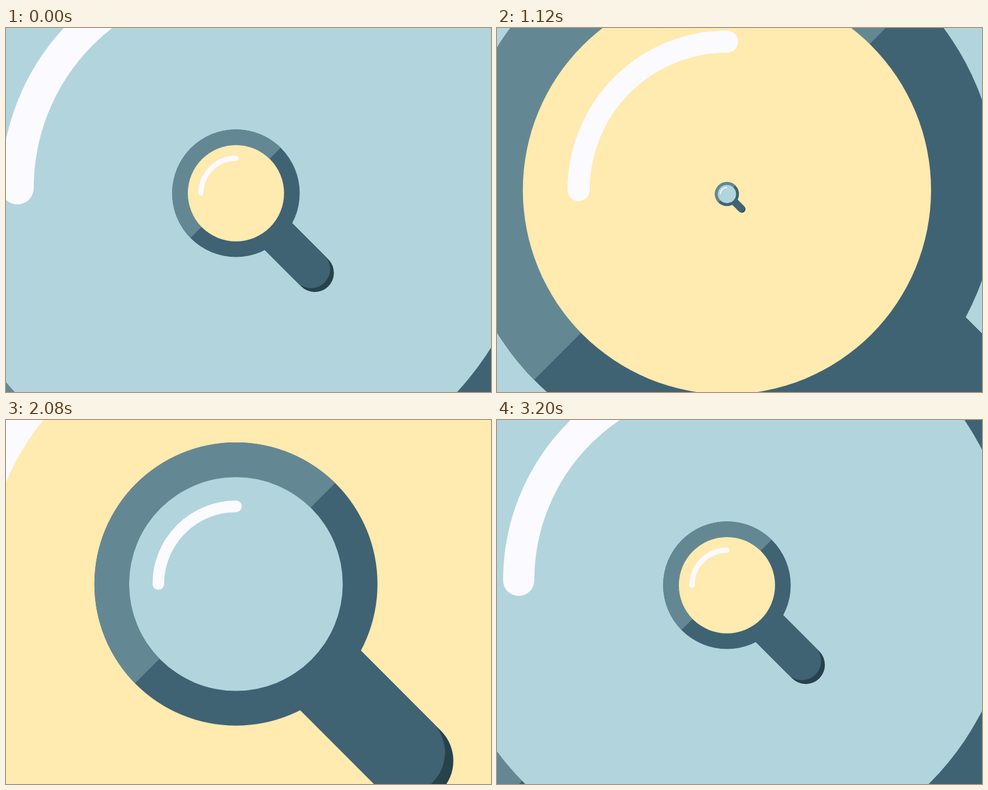
An HTML page with a canvas that plays this animation: 800x600 px, repeating every 3240 ms.

```html
<!DOCTYPE html>
<html lang="en">
<head>
<meta charset="utf-8">
<title>Endless magnifiers</title>
<style>
  html, body { margin: 0; width: 100%; height: 100%; overflow: hidden; background: #b2d4dd; }
  canvas { display: block; width: 800px; height: 600px; }
</style>
</head>
<body>
<canvas id="stage" width="800" height="600"></canvas>
<script>
const ctx = document.getElementById('stage').getContext('2d');
const LOOP = 3240, STEP = 40;
const BLUE = '#b2d4dd', YELLOW = '#ffeaaf';
const RIM_LIGHT = '#648893', RIM_DARK = '#3f6373', TIP = '#25424d', SHINE = '#fbfaff';

// Back to front; birth is the time at which the lens starts to grow.
const lenses = [
  { birth: -2480, glass: BLUE },
  { birth: -800, glass: YELLOW },
  { birth: 800, glass: BLUE },
  { birth: 2400, glass: YELLOW }
];

// Rim radius: slow start, then almost steady growth that eases late.
function radiusAt(age) {
  const late = Math.max(0, age - 2400);
  return age * age / (4530 + 1.944 * age + 0.00046 * late * late);
}

function disc(x, y, r, color) {
  ctx.fillStyle = color;
  ctx.beginPath();
  ctx.arc(x, y, r, 0, Math.PI * 2);
  ctx.fill();
}

function handle(end, color) {
  ctx.strokeStyle = color;
  ctx.lineWidth = 0.6;
  ctx.beginPath();
  ctx.moveTo(0.494, 0.506);
  ctx.lineTo(end - 0.006, end + 0.006);
  ctx.stroke();
}

// Drawn in units of the rim radius.
function drawLens(r, glass) {
  ctx.save();
  ctx.translate(379.3, 274 - 0.0155 * r);
  ctx.scale(r, r);
  ctx.lineCap = 'round';

  handle(1.242, TIP);
  handle(1.183, RIM_DARK);
  disc(0, 0, 1, RIM_DARK);

  const mid = Math.PI * 1.25, half = Math.PI / 2 - 0.0085;
  ctx.fillStyle = RIM_LIGHT;
  ctx.beginPath();
  ctx.arc(0, 0, 1, mid - half, mid + half);
  ctx.fill();

  disc(0, 0, 0.7546, glass);

  ctx.strokeStyle = SHINE;
  ctx.lineWidth = 0.0822;
  ctx.beginPath();
  ctx.arc(0, 0, 0.5484, Math.PI, Math.PI * 1.5);
  ctx.stroke();
  ctx.restore();
}

function draw(time) {
  ctx.fillStyle = BLUE;
  ctx.fillRect(0, 0, 800, 600);
  for (const { birth, glass } of lenses) {
    const age = time - birth;
    if (age > 0) drawLens(radiusAt(age), glass);
  }
}

const start = performance.now();
function tick() {
  const time = (performance.now() - start) % LOOP;
  draw(Math.floor(time / STEP) * STEP);
  requestAnimationFrame(tick);
}
tick();
</script>
</body>
</html>
```
